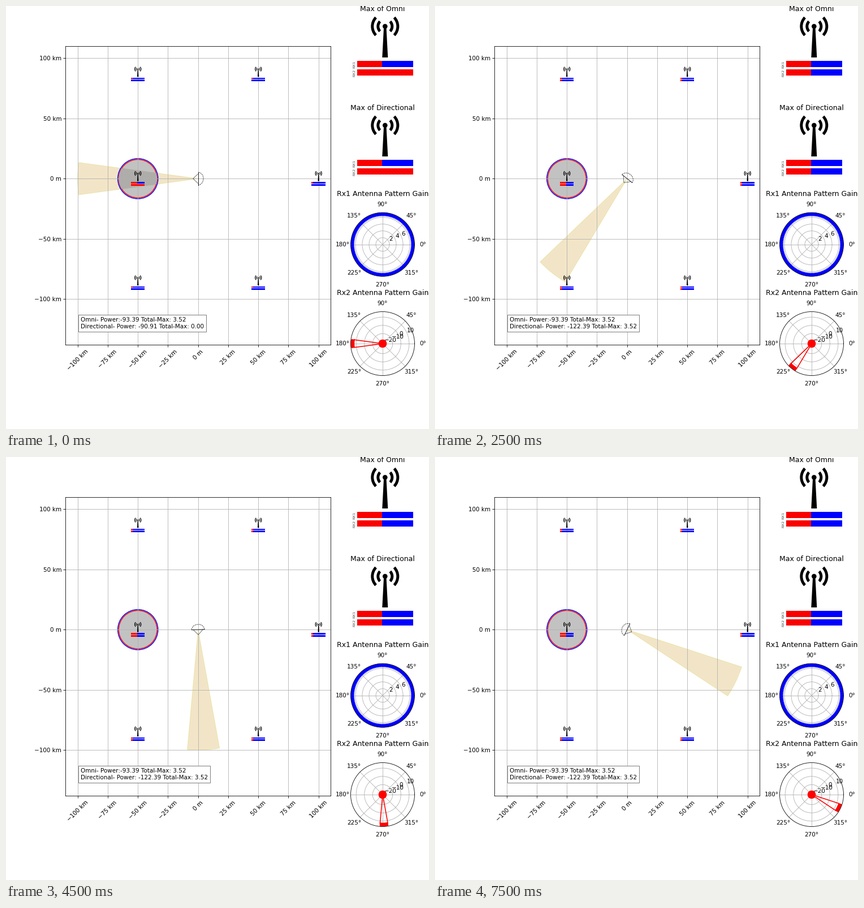
Animation, 748 px wide and 748 px high, one loop 8 s. Source, as a matplotlib script:

```python
import numpy as np
import matplotlib.pyplot as plt
from matplotlib.animation import FuncAnimation
from matplotlib.patches import Circle, Polygon, Rectangle, Wedge

SIZE, DPI = 748, 74.8
FRAMES, INTERVAL = 16, 500
STEP = 360 / 35          # degrees the beam turns per frame
HALF = 7.7               # half width of the beam
LEFT, RIGHT, TOP, BOTTOM = 105.4, 574, 71, 598.6
KM = (RIGHT - LEFT) / 220           # pixels per km
CX, CY = (LEFT + RIGHT) / 2, TOP + 110 * KM
NEAR_FILL, FAR_FILL = 0.447, 0.11
RED, BLUE = "#ff0000", "#0000ff"

plt.rcParams.update({"font.family": "DejaVu Sans", "font.size": 10,
                     "hatch.linewidth": 0.5})
fig = plt.figure(figsize=(SIZE / DPI, SIZE / DPI), dpi=DPI, facecolor="white")


def px_rect(x0, y0, x1, y1):
    return [x0 / SIZE, 1 - y1 / SIZE, (x1 - x0) / SIZE, (y1 - y0) / SIZE]


def km_label(v, _=None):
    return "0 m" if v == 0 else f"{v:.0f} km".replace("-", "\u2212")


# Map
ax = fig.add_axes(px_rect(LEFT, TOP, RIGHT, BOTTOM))
ax.set(xlim=(-110, 110), ylim=(110 - (BOTTOM - TOP) / KM, 110),
       xticks=range(-100, 101, 25), yticks=range(-100, 101, 50))
ax.xaxis.set_major_formatter(km_label)
ax.yaxis.set_major_formatter(km_label)
ax.tick_params(axis="x", rotation=45)
ax.grid(True)

beam = ax.add_patch(Wedge((0, 0), 100, 0, 1, fc=(0.784, 0.569, 0.06, 0.23),
                          ec=(0.75, 0.75, 0, 0.22), lw=1))
omni_ring = ax.add_patch(Circle((-50, 0), 16.7, fc=(0.5, 0.5, 0.5, 0.275),
                                ec=BLUE, lw=1.3))
dir_ring = ax.add_patch(Circle((-50, 0), 15.9, ec=RED, lw=1.3))
overlap = ax.add_patch(Wedge((0, 0), 100, 0, 1, lw=0))

# Pixel layer on top of the whole figure
top = fig.add_axes([0, 0, 1, 1])
top.set(xlim=(0, SIZE), ylim=(SIZE, 0))
top.axis("off")


def tower(x, y, s):
    """Draw a mast with two level bars; return the red part of each bar."""
    def add(patch):
        return top.add_patch(patch)

    hub = (x, y - 37.5 * s)
    add(Circle(hub, 4.3 * s, fc="k", lw=0))
    mast = [(-2.2, -36), (2.2, -36), (5, 17.5), (-5, 17.5)]
    add(Polygon([(x + a * s, y + b * s) for a, b in mast], fc="k", lw=0))
    for r in (15, 25):
        for mid in (0, 180):
            add(Wedge(hub, r * s, mid - 44, mid + 44, width=5 * s, fc="k", lw=0))
    bars = []
    for dy, hatch in ((23.2, "////"), (38.8, "\\\\\\\\")):
        corner = (x - 49.4 * s, y + dy * s)
        add(Rectangle(corner, 98.8 * s, 11 * s, fc=BLUE, lw=0))
        bars.append(add(Rectangle(corner, 0, 11 * s, fc=RED, ec="#d80000", lw=0,
                                  hatch=hatch if s == 1 else None)))
    return bars


def set_levels(bars, levels, s):
    for bar, level in zip(bars, levels):
        bar.set_width(98.8 * s * level)


MINI = 0.2475
h = 50 * np.sqrt(3)
stations = [(-50, 0), (100, 0), (50, h), (-50, h), (-50, -h), (50, -h)]
angles = [np.degrees(np.arctan2(y, x)) % 360 for x, y in stations]
minis = [tower(CX + x * KM, CY - y * KM, MINI) for x, y in stations]
panels = []
for title, y in (("Max of Omni", 0), ("Max of Directional", 175)):
    top.text(666, y + 9, title, size=12, ha="center")
    panels.append(tower(670.3, y + 73.5, 1))
    for name, dy in (("RX1", 103), ("RX2", 118.2)):
        top.text(615.7, y + dy, name, size=6.3, rotation=90, color="#444444",
                 ha="center", va="center")

info = top.text(132, 550, "", va="top",
                bbox=dict(fc="white", ec="#808080", lw=1, pad=4))


# Polar patterns
def polar(title, cy, lim, ticks):
    p = fig.add_axes(px_rect(609.5, cy - 56.5, 722.5, cy + 56.5), projection="polar")
    p.set_ylim(*lim)
    p.set_yticks(ticks)
    top.text(665.7, cy - 86, title, size=12, ha="center")
    return p


rx1 = polar("Rx1 Antenna Pattern Gain", 421.7, (0, 9.4), [2, 4, 6, 8])
rx1.set_yticklabels(["2", "4", "6", ""])
rx2 = polar("Rx2 Antenna Pattern Gain", 597, (-22.1, 16.6), [-20, -10, 0, 10])
turn = np.linspace(0, 2 * np.pi, 241)
rx1.plot(turn, np.full(241, 8.95), color=BLUE, lw=5.2)
rx1.plot(turn, np.where(np.arange(241) % 2, 8.35, 8.9), color=BLUE, lw=1)
lobe, = rx2.plot([], [], color=RED, lw=1.5)

# Dish: u points along the beam, v across it (pixels)
arc = np.linspace(0, np.pi, 30)
dish_parts = [
    (np.array([0, 0]), np.array([-11.5, 11.5]), dict(lw=0.8)),
    (np.array([0, 9, 0]), np.array([-8.5, 0, 8.5]), dict(lw=0.5)),
    (-9.3 * np.sin(arc), 11.3 * np.cos(arc), dict(lw=0.7, dashes=(3, 1.5))),
]
dish = [ax.plot([], [], color="k", **style)[0] for _, _, style in dish_parts]


def pattern(center):
    """Zigzag main lobe at the given angle, small side lobes elsewhere."""
    main = np.linspace(-HALF, HALF, 25)
    side = np.linspace(HALF + 1, 359 - HALF, 90)
    gain = np.r_[np.where(np.arange(25) % 2, 15.9, 12.4),
                 np.where(np.arange(90) % 2, -22, -17.6)]
    theta = np.radians(center + np.r_[main, side])
    return np.r_[theta, theta[0]], np.r_[gain, gain[0]]


def update(i):
    center = 180 + STEP * i
    hit = next((k for k, a in enumerate(angles)
                if abs((center - a + 180) % 360 - 180) < HALF), None)
    far = bool(hit)

    for w in (beam, overlap):
        w.set_theta1(center - HALF)
        w.set_theta2(center + HALF)
    dir_ring.set_center(stations[hit or 0])
    dir_ring.set_facecolor((0.8, 0.54, 0.23, 0.25) if far else (0.5, 0.5, 0.5, 0.275))
    overlap.set_facecolor("#e4e4b6" if far else "#aeadaa")
    overlap.set_clip_path(dir_ring)

    c, s = np.cos(np.radians(center)), np.sin(np.radians(center))
    for line, (u, v, _) in zip(dish, dish_parts):
        line.set_data((u * c - v * s) / KM, (u * s + v * c) / KM)

    levels = []
    for k in range(len(stations)):
        first = FAR_FILL if k else NEAR_FILL
        levels.append((first, first if hit is None else float(k == hit)))
        set_levels(minis[k], levels[k], MINI)
    set_levels(panels[0], levels[0], 1)
    set_levels(panels[1], levels[hit or 0], 1)

    if hit is None:
        power, loss = -122.39, 3.52
    else:
        power, loss = (-96.92, 0.01) if far else (-90.91, 0.0)
    info.set_text("Omni- Power:-93.39 Total-Max: 3.52\n"
                  f"Directional- Power: {power:.2f} Total-Max: {loss:.2f}")
    lobe.set_data(*pattern(center))
    return []


anim = FuncAnimation(fig, update, frames=FRAMES, interval=INTERVAL,
                     repeat=True, repeat_delay=0, blit=False)
plt.show()
```
